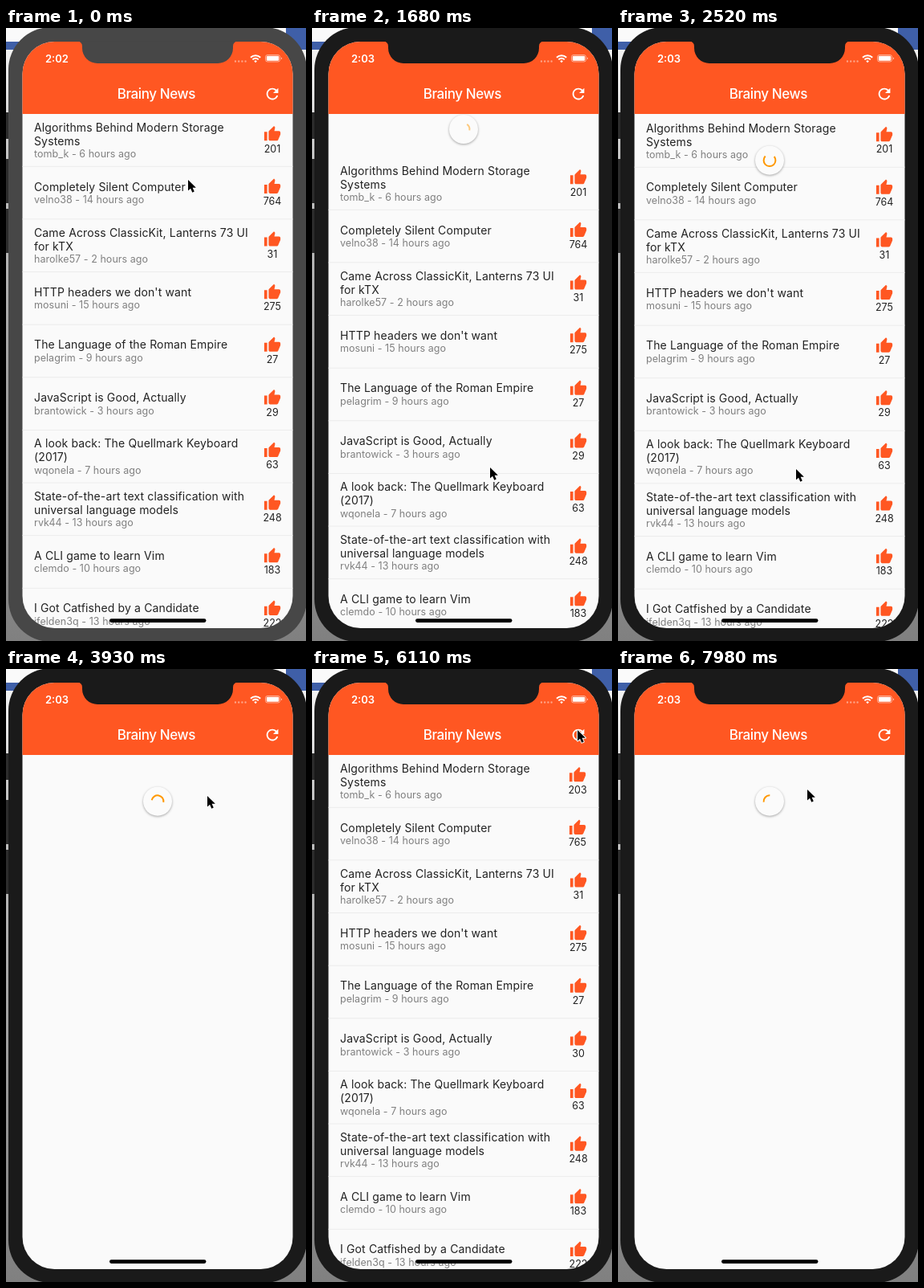
Write an HTML page that moves like this. It is 374 px wide and 763 px high and loops after 8 s.

```html
<!DOCTYPE html>
<html lang="en">
<meta charset="utf-8">
<title>News reader</title>
<style>
html, body { margin: 0; height: 100%; overflow: hidden; }
svg { display: block; width: 100vw; height: 100vh; font-family: Inter, "Liberation Sans", sans-serif; }
.title { font-size: 14px; letter-spacing: .14px; fill: #222; }
.by { font-size: 12.5px; letter-spacing: .05px; fill: #808080; }
.score { font-size: 12.5px; fill: #222; text-anchor: middle; }
.disc { fill: #fbfbfb; filter: drop-shadow(0 1px 1.5px rgba(0,0,0,.35)); }
</style>
<svg viewBox="0 0 374 763">
  <defs>
    <clipPath id="screen"><rect x="20.5" y="17" width="337" height="730" rx="40"/></clipPath>
    <clipPath id="body"><rect x="20" y="107" width="338" height="640"/></clipPath>
    <linearGradient id="desk" x2="0" y2="1">
      <stop offset=".03" stop-color="#f4f4f4"/><stop offset=".1" stop-color="#e4e4e4"/>
      <stop offset=".2" stop-color="#c4c4c4"/><stop offset=".5" stop-color="#a8a8a8"/>
      <stop offset="1" stop-color="#808080"/>
    </linearGradient>
    <path id="thumb" transform="scale(.92)" fill="#ff5722" d="M1 21h4V9H1v12zm22-11c0-1.1-.9-2-2-2h-6.31l.95-4.57.03-.32c0-.41-.17-.79-.44-1.06L14.17 1 7.59 7.59C7.22 7.95 7 8.45 7 9v10c0 1.1.9 2 2 2h9c.83 0 1.54-.5 1.84-1.22l3.02-7.05c.09-.23.14-.47.14-.73v-2z"/>
  </defs>

  <!-- desktop behind the phone -->
  <rect width="374" height="763" fill="url(#desk)"/>
  <rect width="349" height="17" fill="#fafafa"/>
  <path d="M0 17H349V0H374V27H0z" fill="#3f5fa8"/>
  <path d="M0 105h5v33H0zM0 163h5v55H0zM0 225h5v55H0z" fill="#2c2c2c"/>
  <rect id="shell" x="3" y="-1" width="372" height="765" rx="53"/>

  <g clip-path="url(#screen)">
    <rect x="20" y="17" width="338" height="730" fill="#fafafa"/>
    <g clip-path="url(#body)">
      <g id="list"></g>
      <g id="spinner">
        <circle class="disc" r="18"/>
        <path id="arc" fill="none" stroke="#ff9800" stroke-width="2"/>
      </g>
    </g>
    <rect x="20" y="17" width="338" height="90" fill="#ff5722"/>
    <circle id="ripple" cx="332" cy="82" fill="#fff"/>
    <text x="187.3" y="88" text-anchor="middle" font-size="17" font-weight="500" letter-spacing="-.4" fill="#fff">Brainy News</text>
    <path transform="translate(321 71) scale(.92)" fill="#fff" d="M17.65 6.35C16.2 4.9 14.21 4 12 4c-4.42 0-7.99 3.58-7.99 8s3.57 8 7.99 8c3.73 0 6.84-2.55 7.73-6h-2.08c-.82 2.33-3.04 4-5.65 4-3.31 0-6-2.69-6-6s2.69-6 6-6c1.66 0 3.14.69 4.22 1.78L13 11h7V4l-2.35 2.35z"/>
    <text id="clock" x="49" y="42.5" font-size="13" font-weight="600" fill="#fff"></text>
    <path d="M286 41.5h15" stroke="#fff" stroke-opacity=".45" stroke-width="2.4" stroke-linecap="round" stroke-dasharray="0 4.2"/>
    <g fill="none" stroke="#fff" stroke-width="2">
      <path d="M305 36.7a8.6 8.6 0 0 1 12.2 0M307.4 39.4a5.2 5.2 0 0 1 7.4 0"/>
      <rect x="323.5" y="33.5" width="18" height="8.5" rx="2.5" stroke-width="1" stroke-opacity=".5"/>
    </g>
    <path d="M309.3 41.2a2.6 2.6 0 0 1 3.6 0l-1.8 2zM343 36.2q1.8 1.6 0 3.2z" fill="#fff"/>
    <rect x="324.8" y="34.8" width="15.4" height="5.9" rx="1.3" fill="#fff"/>
    <rect x="129" y="735.3" width="120.5" height="4.6" rx="2.3"/>
  </g>
  <path id="notch" d="M89 16.5q6 .5 6 6.5v2a19 19 0 0 0 19 19h150a19 19 0 0 0 19-19v-2q0-6 6-6.5z"/>
  <path id="cursor" stroke="#fff" stroke-width="2" paint-order="stroke" stroke-linejoin="round" d="M0 0v13.5l3.1-2.8 2.2 5 2.5-1.1-2.2-4.8h4.3z"/>
</svg>
<script>
const LOOP = 8000, ROW = 65.62, TOP = 106.7;
const $ = id => document.getElementById(id);
const stories = [
  ['Algorithms Behind Modern Storage|Systems', 'tomb_k', 6, 201, 203],
  ['Completely Silent Computer', 'velno38', 14, 764, 765],
  ['Came Across ClassicKit, Lanterns 73 UI|for kTX', 'harolke57', 2, 31],
  ["HTTP headers we don't want", 'mosuni', 15, 275],
  ['The Language of the Roman Empire', 'pelagrim', 9, 27],
  ['JavaScript is Good, Actually', 'brantowick', 3, 29, 30],
  ['A look back: The Quellmark Keyboard|(2017)', 'wqonela', 7, 63],
  ['State-of-the-art text classification with|universal language models', 'rvk44', 13, 248],
  ['A CLI game to learn Vim', 'clemdo', 10, 183],
  ['I Got Catfished by a Candidate', 'jfelden3q', 13, 222],
];

function listMarkup(fresh) {
  return stories.map(([title, user, hours, score, later = score], i) => {
    const mid = TOP + ROW * (i + .5), lines = title.split('|'), two = lines.length > 1;
    const x = 332 - (fresh && i < 2);
    const text = (cls, tx, y, s) => `<text class="${cls}" x="${tx}" y="${y}">${s}</text>`;
    return lines.map((s, k) => text('title', 35, mid + (two ? -10.8 + 17 * k : -2.6), s)).join('')
      + text('by', 35, mid + (two ? 21.3 : 13), `${user} - ${hours} hours ago`)
      + `<use href="#thumb" x="${x - 11}" y="${mid - 18.5}"/>`
      + text('score', x, mid + 15, fresh ? later : score)
      + `<path d="M20 ${mid + ROW / 2}h338" stroke="#ececec"/>`;
  }).join('');
}
const pages = [listMarkup(false), listMarkup(true)];

const clamp = v => Math.min(1, Math.max(0, v));
const smooth = v => (v = clamp(v), v * v * (3 - 2 * v));

// Eased interpolation through [time, ...values] keys
function track(keys, t) {
  const i = keys.findIndex(k => k[0] > t);
  if (i < 0) return keys[keys.length - 1].slice(1);
  if (!i) return keys[0].slice(1);
  const a = keys[i - 1], b = keys[i], p = smooth((t - a[0]) / (b[0] - a[0]));
  return a.slice(1).map((v, k) => v + (b[k + 1] - v) * p);
}

const pointer = [
  [0, 227, 189], [60, 227, 189], [300, 268, 158], [560, 284, 180], [830, 250, 209],
  [890, 248, 215], [1220, 224, 430], [1320, 222, 432], [1680, 222, 547], [1760, 222, 549],
  [2720, 222, 549], [2960, 233, 395], [3160, 273, 242], [3400, 287, 190],
  [3650, 276, 174], [3930, 251, 158], [4230, 258, 166], [4700, 285, 178], [5120, 269, 168],
  [5180, 269, 168], [5410, 250, 138], [5590, 252, 137], [6110, 331, 76],
  [6480, 331, 77], [6760, 280, 150], [6980, 237, 163], [7150, 238, 164],
  [7450, 258, 180], [7700, 246, 164], [7920, 236, 150],
];
const pull = [[1320, 0], [1680, 54]];
const drop = [[1320, 86], [1680, 126], [1700, 126], [1880, 165]];

// cubic-bezier(.4, 0, .2, 1)
function fastOutSlowIn(x) {
  x = clamp(x);
  let lo = 0, hi = 1, s;
  for (let i = 0; i < 20; i++) {
    s = (lo + hi) / 2;
    const bx = 1.2 * (1 - s) ** 2 * s + .6 * (1 - s) * s * s + s ** 3;
    if (bx < x) lo = s; else hi = s;
  }
  return 3 * s * s - 2 * s ** 3;
}

function arcPath(start, sweep) {
  const at = deg => `${7.4 * Math.cos(deg * Math.PI / 180)} ${7.4 * Math.sin(deg * Math.PI / 180)}`;
  return `M${at(start)}A7.4 7.4 0 ${+(sweep > 180)} 1 ${at(start + sweep)}`;
}

function spinnerArc(elapsed) {
  const turns = elapsed / 1333, n = Math.floor(turns), p = turns - n;
  const head = fastOutSlowIn(p * 2), tail = fastOutSlowIn(p * 2 - 1);
  return arcPath(-90 + 270 * tail + 306 * p - 144 * n, Math.max(2, 270 * (head - tail)));
}

let shown;
function draw(t) {
  const active = t >= 1240, color = active ? '#1a1a1a' : '#474747';
  $('shell').setAttribute('fill', color);
  $('notch').setAttribute('fill', color);
  $('clock').textContent = active ? '2:03' : '2:02';

  const page = t < 2680 ? 0 : t >= 4400 && t < 6440 ? 1 : -1;
  if (page !== shown) $('list').innerHTML = pages[shown = page] || '';
  const shift = t < 1700 ? track(pull, t)[0] : 54 * Math.exp((1700 - t) / 200);
  $('list').setAttribute('transform', `translate(0 ${page ? 0 : shift})`);

  const visible = t > 1320 && t < 4600 || t >= 6440;
  const scale = t < 6440 ? 1 - smooth((t - 4400) / 200) : smooth((t - 6440) / 150);
  const y = t < 2000 ? track(drop, t)[0] : 164.7;
  $('spinner').setAttribute('transform', `translate(189 ${y}) scale(${visible ? scale : 0})`);
  const dragging = t < 1720;
  $('arc').setAttribute('d', dragging
    ? arcPath(-55, 65 * clamp((t - 1320) / 360) + 1)
    : spinnerArc(t - (t < 2680 ? -2012 : t < 6000 ? 2315 : 6447)));
  $('arc').setAttribute('opacity', dragging ? .5 * clamp((t - 1320) / 360) : 1);

  const tap = (t - 6250) / 500;
  $('ripple').setAttribute('r', 32 * smooth(tap * 2));
  $('ripple').setAttribute('opacity', tap > 0 && tap < 1 ? .25 * (1 - tap) : 0);

  $('cursor').setAttribute('transform', `translate(${track(pointer, t)})`);
}

const begin = performance.now();
function frame() {
  draw((performance.now() - begin) % LOOP);
  requestAnimationFrame(frame);
}
frame();
</script>
</html>
```
